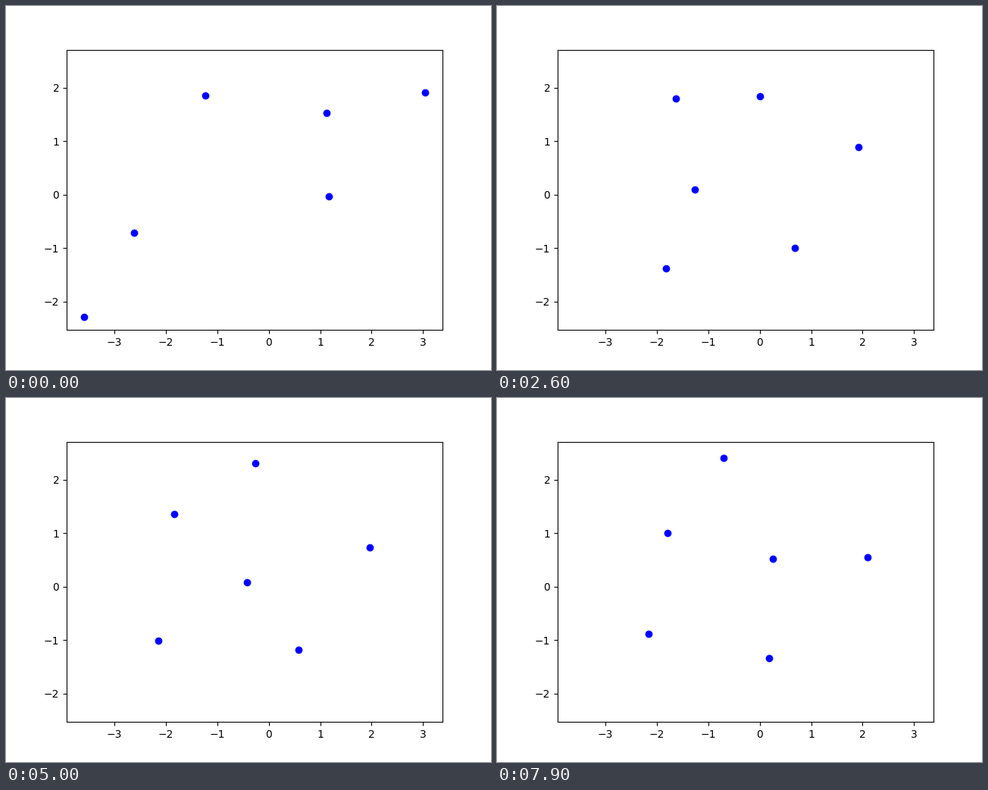
Write a matplotlib script that moves like this. It is 640 by 480 pixels and loops after 8000 ms.

```python
import matplotlib.pyplot as plt
import numpy as np
from matplotlib.animation import FuncAnimation

W, H, DPI = 640, 480, 100
FRAMES, STEP = 80, 100
TAU = 0.23  # decay time of the initial collapse, in seconds

# Six scattered points, in pixels from the top left
START = np.array([(263, 118), (423, 141), (553, 114),
                  (426, 251), (169, 299), (103, 410)], float)

# Poses that the points drift through after the collapse, by time in seconds
POSES = {
    1.4: [(245, 111), (347, 146), (477, 168), (396, 320), (251, 241), (221, 346)],
    2.6: [(236, 122), (347, 119), (477, 186), (393, 319), (261, 242), (223, 346)],
    5.0: [(222, 153), (329, 86), (480, 197), (386, 332), (318, 243), (201, 320)],
    7.9: [(225, 178), (299, 79), (489, 210), (359, 343), (364, 212), (200, 311)],
}
TIMES = np.array(list(POSES))
KEYS = np.array(list(POSES.values()), float)
SLOPES = np.gradient(KEYS, TIMES, axis=0, edge_order=2)


def drift(t):
    """Cubic Hermite path through the poses, eased in before the first."""
    if t < TIMES[0]:
        back = TIMES[0] - t
        return KEYS[0] - SLOPES[0] * back * (1 - 0.15 * back)
    i = min(np.searchsorted(TIMES, t, side="right") - 1, len(TIMES) - 2)
    h = TIMES[i + 1] - TIMES[i]
    u = (t - TIMES[i]) / h
    v = 1 - u
    return (v * v * (1 + 2 * u) * KEYS[i] + u * u * (3 - 2 * u) * KEYS[i + 1]
            + h * u * v * (v * SLOPES[i] - u * SLOPES[i + 1]))


def positions(t):
    return drift(t) + (START - drift(0)) * np.exp(-t / TAU)


fig, ax = plt.subplots(figsize=(W / DPI, H / DPI), dpi=DPI)
ax.set_xlim(-3.928, 3.378)
ax.set_ylim(-2.531, 2.711)
dots, = ax.plot([], [], "bo")
to_data = ax.transData.inverted()


def update(frame):
    px = positions(frame * STEP / 1000)
    px[:, 1] = H - px[:, 1]
    dots.set_data(*to_data.transform(px).T)
    return dots,


anim = FuncAnimation(fig, update, frames=FRAMES, interval=STEP,
                     repeat=True, repeat_delay=0)
plt.show()
```
